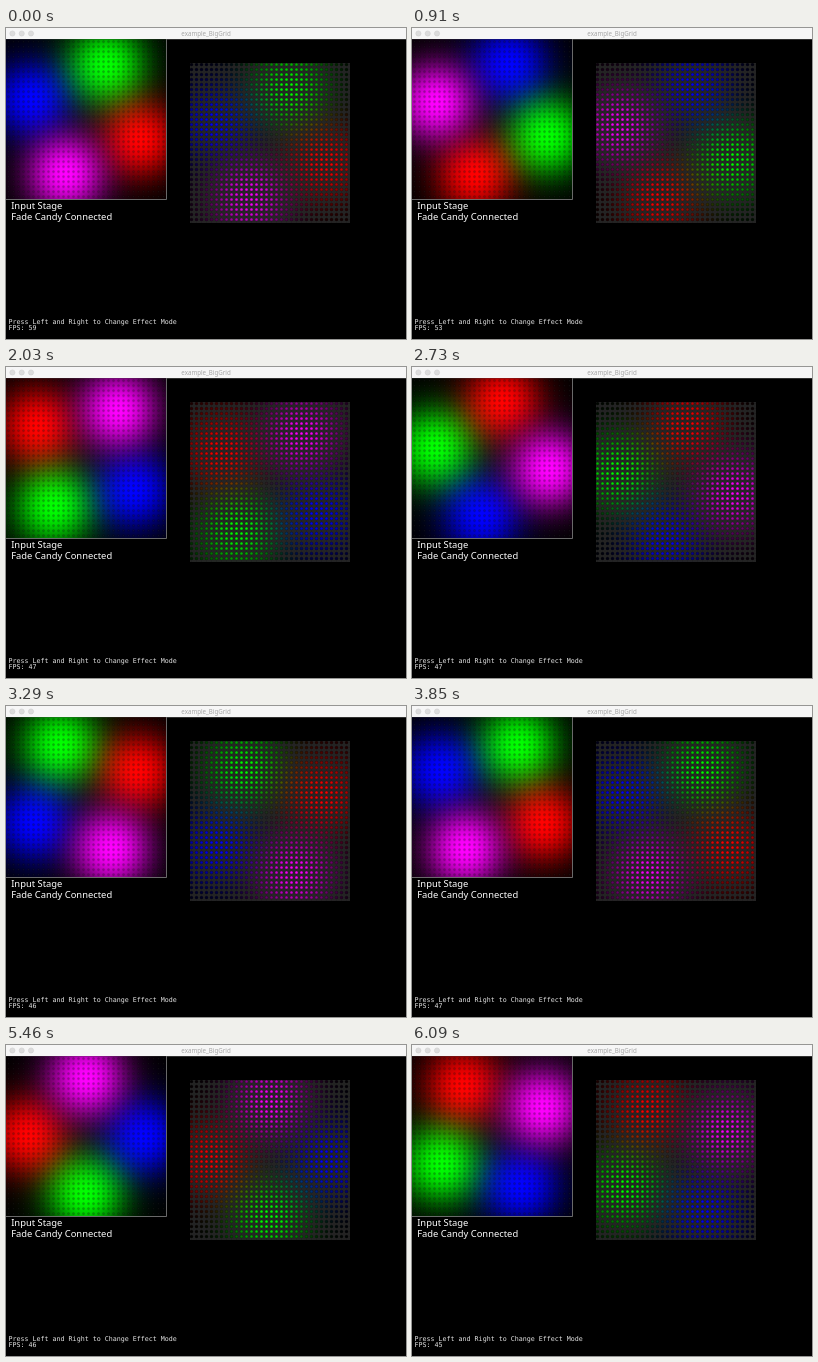
An HTML page that plays this animation: 400 by 311 pixels, repeating every 6160 ms.

```html
<!DOCTYPE html>
<html lang="en">
<head>
<meta charset="utf-8">
<title>Orbiting lights</title>
<style>
  html, body { margin: 0; width: 100%; height: 100%; overflow: hidden; background: #000; }
  svg { display: block; width: 100vw; height: 100vh; }
  .layer { isolation: isolate; }
  .blob { mix-blend-mode: screen; }
  .label { font: 9.4px "Noto Sans", "Open Sans", sans-serif; fill: #fff; }
  .mono { font: 6.66px "DejaVu Sans Mono", monospace; fill: #e4e4e4; }
  .title { font: 6.2px "Noto Sans", "Open Sans", sans-serif; fill: #a6a6a6; text-anchor: middle; }
</style>
</head>
<body>
<svg viewBox="0 0 400 311">
  <defs id="defs">
    <clipPath id="stageClip"><rect width="160" height="160"/></clipPath>
    <pattern id="marks" width="5" height="5" patternUnits="userSpaceOnUse">
      <circle cx="2.5" cy="2.5" r="1.2" fill="#000" fill-opacity=".32"/>
      <circle cx="2.5" cy="2.5" r=".6" fill="#888" fill-opacity=".12"/>
    </pattern>
    <pattern id="holes" x="-1" y="-1" width="5" height="5" patternUnits="userSpaceOnUse">
      <path fill-rule="evenodd" fill="#242424"
        d="M0 0H5V5H0Z M.9 2.5a1.6 1.6 0 1 0 3.2 0a1.6 1.6 0 1 0 -3.2 0Z"/>
      <circle cx="2.5" cy="2.5" r="1.35" fill="none" stroke="#000" stroke-width=".5" stroke-opacity=".6"/>
    </pattern>
  </defs>

  <rect width="400" height="311"/>
  <rect width="400" height="11.2" fill="#f6f6f6"/>
  <g fill="#dcdcdc" stroke="#cbcbcb" stroke-width=".5">
    <circle cx="6.4" cy="5.5" r="2.6"/>
    <circle cx="15.7" cy="5.5" r="2.6"/>
    <circle cx="25" cy="5.5" r="2.6"/>
  </g>
  <text class="title" x="200" y="8">example_BigGrid</text>

  <g transform="translate(0 11.2)">
    <g class="layer" clip-path="url(#stageClip)">
      <rect width="160" height="160"/>
      <g class="lights"></g>
    </g>
    <rect width="160" height="160" fill="url(#marks)"/>
    <path d="M0 160.3H160.5V0" fill="none" stroke="#858585" stroke-width=".8"/>
  </g>

  <g transform="translate(184 35)">
    <g class="layer" clip-path="url(#stageClip)">
      <rect width="160" height="160"/>
      <g class="lights"></g>
    </g>
    <rect width="160" height="160" fill="url(#holes)" opacity=".97"/>
  </g>

  <text class="label" x="5.2" y="181.3">Input Stage</text>
  <text class="label" x="5.2" y="191.8">Fade Candy Connected</text>
  <text class="mono" x="2.5" y="296">Press Left and Right to Change Effect Mode</text>
  <text class="mono" x="2.5" y="302.4" id="fps"></text>
</svg>
<script>
const LOOP = 6160, STEP = 70;
const CENTER = 80, ORBIT = 58, SPREAD = 39, REACH = 90, STOPS = 18;
const START_ANGLE = -69.7, DEG_PER_SECOND = 95.3;
const COLORS = ['#0f0', '#f00', '#f0f', '#00f'];
// [seconds, measured rate]
const RATES = [[0, 59.9], [.91, 53.5], [2.03, 47.5], [2.4, 46.5], [2.73, 47.5],
  [3.3, 46.5], [3.85, 47.5], [4.4, 46], [4.83, 45.5], [5.4, 46.5], [6.09, 45.5]];

function make(tag, attrs, parent) {
  const node = document.createElementNS('http://www.w3.org/2000/svg', tag);
  for (const key in attrs) node.setAttribute(key, attrs[key]);
  return parent.appendChild(node);
}

COLORS.forEach((color, i) => {
  const gradient = make('radialGradient', { id: 'glow' + i }, document.getElementById('defs'));
  for (let k = 0; k <= STOPS; k++) {
    const falloff = k < STOPS ? Math.exp(-((k / STOPS * REACH / SPREAD) ** 2.2)) : 0;
    make('stop', { offset: k / STOPS, 'stop-color': color, 'stop-opacity': falloff.toFixed(4) }, gradient);
  }
});

const lights = [...document.querySelectorAll('.lights')].map(group =>
  COLORS.map((_, i) => make('circle', { class: 'blob', r: REACH, fill: `url(#glow${i})` }, group)));
const fps = document.getElementById('fps');

function rateAt(s) {
  const next = RATES.findIndex(([time]) => time > s);
  if (next < 0) return RATES[RATES.length - 1][1];
  const [t0, r0] = RATES[next - 1], [t1, r1] = RATES[next];
  return r0 + (r1 - r0) * (s - t0) / (t1 - t0);
}

function draw(ms) {
  const seconds = Math.floor(ms % LOOP / STEP) * STEP / 1000;
  for (const group of lights) {
    group.forEach((blob, i) => {
      const angle = (START_ANGLE + DEG_PER_SECOND * seconds + i * 90) * Math.PI / 180;
      blob.setAttribute('cx', CENTER + ORBIT * Math.cos(angle));
      blob.setAttribute('cy', CENTER + ORBIT * Math.sin(angle));
    });
  }
  fps.textContent = 'FPS: ' + Math.floor(rateAt(seconds));
}

const start = performance.now();
function tick() {
  draw(performance.now() - start);
  requestAnimationFrame(tick);
}
tick();
</script>
</body>
</html>
```
